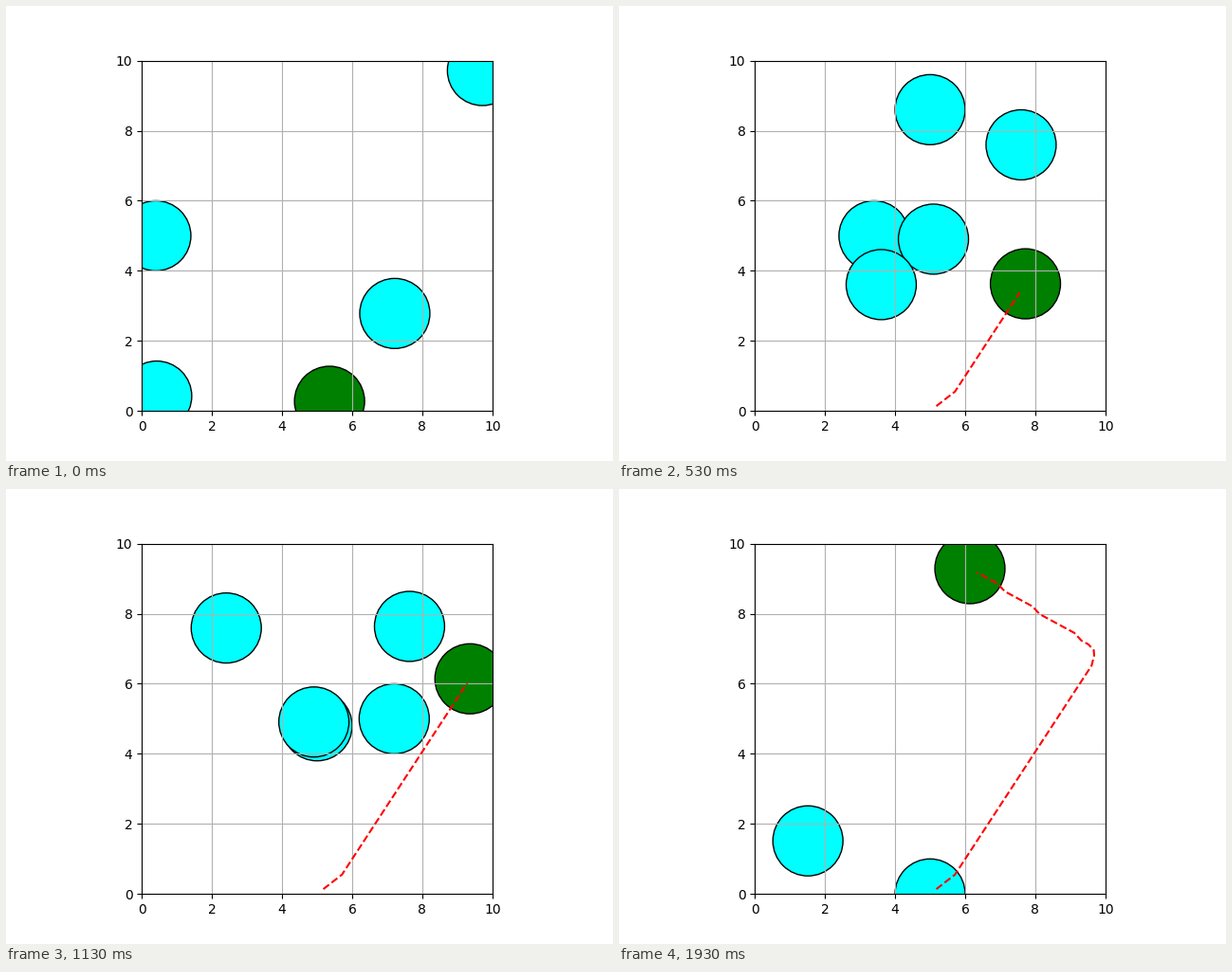
These frames come from a looping animation (640 by 480 pixels, 1960 ms). A matplotlib script:

```python
import matplotlib.pyplot as plt
import numpy as np
from matplotlib.animation import FuncAnimation
from matplotlib.patches import Circle

STEPS = 60
DT = 0.1
RADIUS = 1.0
CLEARANCE = 2.2 * RADIUS
VMAX = 3.0
START = np.array([5.0, 0.0])
GOAL = np.array([5.0, 10.0])
LOOP_MS = 1960

# start x, start y, speed, heading
OBSTACLES = [
    (5, 12, 2, -np.pi / 2),
    (0, 5, 2, 0),
    (10, 10, 2, -3 * np.pi / 4),
    (7.5, 2.5, 2, 3 * np.pi / 4),
    (0, 0, 3, np.pi / 4),
]


def obstacle_track(x, y, speed, heading):
    """Positions after each step, and the constant velocity."""
    vel = speed * np.array([np.cos(heading), np.sin(heading)])
    steps = np.arange(1, STEPS + 1)[:, None]
    return np.array([x, y]) + steps * DT * vel, vel


def velocity_samples():
    speed, angle = np.meshgrid(np.linspace(0, VMAX, 5),
                               np.linspace(0, 2 * np.pi, 20))
    return np.column_stack([(speed * np.cos(angle)).ravel(),
                            (speed * np.sin(angle)).ravel()])


def collides(samples, pos, obs_pos, obs_vel):
    """Mask of the velocities inside the obstacle's collision cone."""
    dx, dy = pos - obs_pos
    theta = np.arctan2(dy, dx)
    phi = np.arcsin(CLEARANCE / max(np.hypot(dx, dy), CLEARANCE))
    left, right = theta + phi, theta - phi
    sides = np.array([[np.sin(left), -np.cos(left)],
                      [-np.sin(right), np.cos(right)]])
    return (samples @ sides.T < sides @ obs_vel).all(axis=1)


def robot_track(tracks):
    """Steer to the goal with the best velocity outside every cone."""
    samples = velocity_samples()
    pos = START
    path = []
    for i in range(STEPS):
        to_goal = GOAL - pos
        dist = np.linalg.norm(to_goal)
        wanted = VMAX * to_goal / dist if dist > RADIUS / 5 else np.zeros(2)
        blocked = np.zeros(len(samples), dtype=bool)
        for track, vel in tracks:
            blocked |= collides(samples, pos, track[i], vel)
        cost = np.linalg.norm(samples - wanted, axis=1)
        cost[blocked] = np.inf
        pos = pos + samples[np.argmin(cost)] * DT
        path.append(pos)
    return np.array(path)


tracks = [obstacle_track(*spec) for spec in OBSTACLES]
path = robot_track(tracks)

fig = plt.figure(figsize=(6.4, 4.8), dpi=100)
ax = fig.add_subplot(111, xlim=(0, 10), ylim=(0, 10), autoscale_on=False)
ax.set_aspect("equal")
ax.grid()


def add_disc(color):
    return ax.add_patch(Circle((0, 0), RADIUS, facecolor=color,
                               edgecolor="black"))


robot = add_disc("green")
discs = [add_disc("aqua") for _ in tracks]
trail, = ax.plot([], [], "--r")


def animate(i):
    robot.center = path[i]
    for disc, (track, _) in zip(discs, tracks):
        disc.center = track[i]
    trail.set_data(path[:i, 0], path[:i, 1])
    return [robot, *discs, trail]


frames = range(1, STEPS)
anim = FuncAnimation(fig, animate, frames=frames,
                     init_func=lambda: animate(1),
                     interval=LOOP_MS / len(frames),
                     repeat=True, repeat_delay=0)
plt.show()
```
